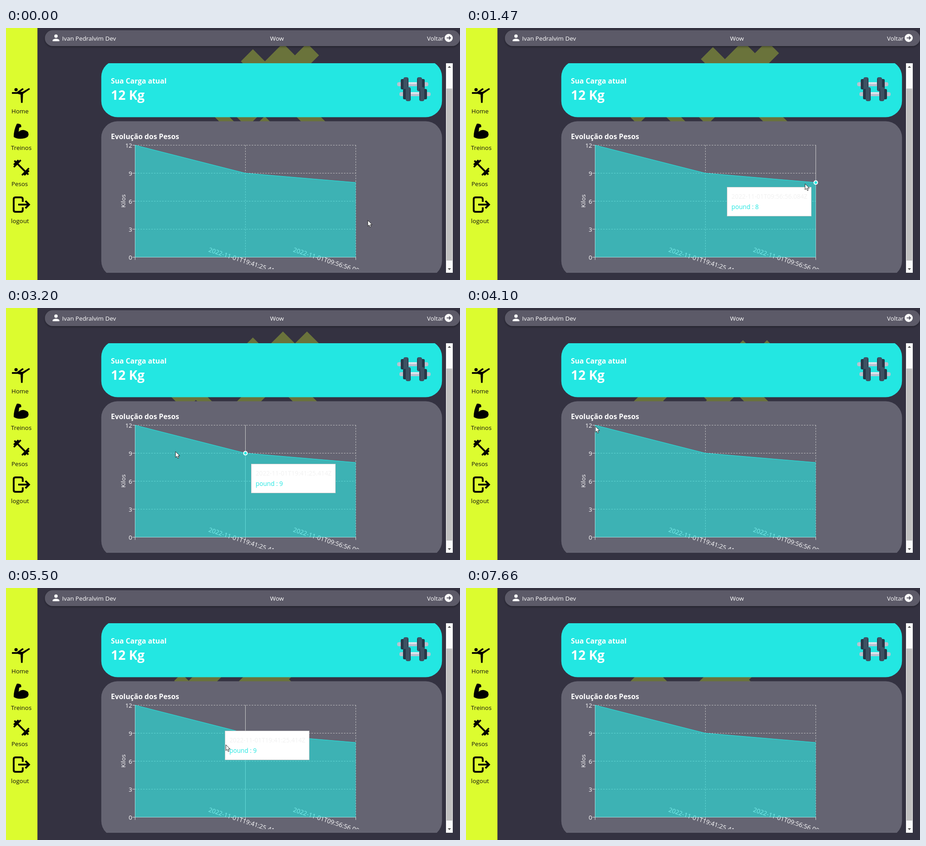
An HTML page for the animation above (7760 ms loop, 1004 by 558 pixels).

```html
<!DOCTYPE html>
<html lang="pt-BR">
<head>
<meta charset="utf-8">
<title>Evolução dos Pesos</title>
<style>
  html, body { margin: 0; width: 100%; height: 100%; overflow: hidden; background: #343241; }
  svg { display: block; width: 100%; height: 100%; }
  text { font: 13.4px "Open Sans", "Noto Sans", sans-serif; fill: #fff; }
  .nav text { fill: #111; }
  .title { font-size: 15.8px; font-weight: 700; }
  .big { font-size: 28.3px; font-weight: 700; }
  .date { font-size: 13.7px; }
  .grid { stroke: #ccc; stroke-dasharray: 3 3; }
  .axis { stroke: #ddd; }
  .end { text-anchor: end; }
</style>
</head>
<body>
<svg viewBox="0 0 1004 558" preserveAspectRatio="none">
  <defs>
    <path id="half" d="M17 15.57 8.43 7 12 3.43 10.57 2 9.14 3.43 7.71 2 5.57 4.14 4.14 2.71 2.71 4.14 4.14 5.57 2 7.71 3.43 9.14 2 10.57 3.43 12 7 8.43 15.57 17z"/>
    <g id="barbell">
      <use href="#half"/>
      <use href="#half" transform="rotate(180 12 12)"/>
    </g>
    <g id="plates">
      <rect x="8" y="4" width="9" height="23" rx="3" fill="#263747"/>
      <rect x="14" width="11" height="31" rx="4" fill="#3d5163"/>
      <path d="M24 3v25" stroke="#2b3d4e" stroke-width="2"/>
    </g>
    <g id="weight">
      <rect y="11" width="69" height="9" rx="4" fill="#b9c1d0"/>
      <rect x="25" y="11" width="18" height="4" fill="#dfe4ed"/>
      <use href="#plates"/>
      <use href="#plates" transform="translate(69) scale(-1 1)"/>
    </g>
    <clipPath id="view"><rect x="210" y="78" width="755" height="464"/></clipPath>
    <clipPath id="plot"><rect x="232" y="250" width="560" height="284"/></clipPath>
    <filter id="shadow" x="-5%" y="-30%" width="110%" height="190%">
      <feDropShadow dx="0" dy="2" stdDeviation="2" flood-opacity=".35"/>
    </filter>
  </defs>

  <rect width="1004" height="558" fill="#343241"/>
  <g fill="#6a733b">
    <use id="large" href="#barbell"/>
    <use id="small" href="#barbell"/>
  </g>

  <rect x="86" y="5" width="918" height="35" rx="17.5" fill="#5b5a67" filter="url(#shadow)"/>
  <path transform="translate(99.3 10.5) scale(.94)" fill="#fff" d="M12 12a4 4 0 1 0 0-8 4 4 0 0 0 0 8zm0 2c-2.67 0-8 1.34-8 4v2h16v-2c0-2.66-5.33-4-8-4z"/>
  <text x="124" y="28">Ivan Pedralvim Dev</text>
  <text x="584" y="28">Wow</text>
  <text x="931" y="28">Voltar</text>
  <circle cx="979" cy="22" r="9" fill="#fff"/>
  <path d="M974.5 22h8M979.5 18.5l3.5 3.5-3.5 3.5" stroke="#5b5a67" stroke-width="2" fill="none"/>

  <g class="nav">
    <rect width="69.5" height="558" fill="#dcfc2f"/>
    <path transform="translate(11.3 125.7) scale(1.82)" d="M4 6a2 2 0 1 1 4 0 2 2 0 0 1-4 0zM1 9h6l7-5 1.310 1.520L11.140 8.500H14L21.800 4 23 5.400 14.500 11 14 22h-2l-.5-10L8 11H1z"/>
    <path d="M24 212Q28 211 33 214L34 219 29 221 28 230Q33 225 40 226 50 228 50 236 49 244 36 245 22 246 17 241 17 226 24 212z"/>
    <use href="#barbell" transform="translate(12.4 287.6) scale(1.8)"/>
    <path d="M37 385v-6q0-4-4-4H21q-4 0-4 4v24q0 4 4 4h12q4 0 4-4v-6M27 391h23M43 383l8 8-8 8" fill="none" stroke="#000" stroke-width="4"/>
    <text x="12" y="189">Home</text>
    <text x="11" y="270">Treinos</text>
    <text x="12" y="350">Pesos</text>
    <text x="11" y="432">logout</text>
  </g>

  <g clip-path="url(#view)">
    <rect x="210.700" y="72" width="753.500" height="125.400" rx="36" fill="#23e7e2"/>
    <rect x="210.700" y="206.600" width="753.500" height="345" rx="36" fill="#656472"/>
  </g>
  <text class="title" x="232" y="123">Sua Carga atual</text>
  <text class="big" x="232" y="159">12 Kg</text>
  <use href="#weight" x="865" y="109"/>
  <use href="#weight" x="870" y="131"/>
  <text class="title" x="232" y="246">Evolução dos Pesos</text>

  <g clip-path="url(#plot)">
    <g id="scale"></g>
    <text class="date" transform="translate(447 495) rotate(18)">2022-11-01T19:41:25.414Z</text>
    <text class="date" transform="translate(634 495) rotate(18)">2022-11-01T09:56:56.084Z</text>
    <path id="line" d="M0 259V507" stroke="#ccc"/>
    <path id="area" fill="#23e7e2" fill-opacity=".6"/>
    <path id="curve" fill="none" stroke="#23e7e2"/>
  </g>
  <text transform="translate(264 383) rotate(-90)" text-anchor="middle">Kilos</text>
  <circle id="dot" r="4" fill="#23e7e2" stroke="#fff" stroke-width="2"/>

  <rect x="973" y="78" width="15" height="464" fill="#fafafa"/>
  <rect x="974" y="134" width="13" height="381" fill="#c1c1c1"/>
  <path d="M977 88l3.500-4 3.500 4zM977 532l3.500 4 3.500-4z" fill="#505050"/>

  <g id="tip">
    <rect x=".5" y=".5" width="186" height="64" fill="#fff" stroke="#ccc"/>
    <text id="date" class="date" x="10" y="26" style="fill:#f1f1f1"></text>
    <text id="value" class="date" x="10" y="49" style="fill:#23e7e2"></text>
  </g>
  <path id="cursor" d="M0 0V13l3-2.700 2 4.700 2.300-1-2-4.500h4.200z" fill="#fff" stroke="#222"/>
</svg>
<script>
const LOOP = 7760;
const CURSOR_EXIT = 7120;
const HOVER_LAG = 150;
const TIP_LAG = 420;
const SLIDE = 385;
const STEP = 20;
const chart = { left: 285.5, right: 773.5, top: 259.5, bottom: 507.5 };
const $ = id => document.getElementById(id);

const points = [
  { pound: 12, date: "2022-11-02T11:20:31.207Z" },
  { pound: 9, date: "2022-11-01T19:41:25.414Z" },
  { pound: 8, date: "2022-11-01T09:56:56.084Z" }
];
const spacing = (chart.right - chart.left) / (points.length - 1);
const yOf = kilos => chart.bottom - (chart.bottom - chart.top) * kilos / 12;
points.forEach((p, i) => {
  p.x = chart.left + i * spacing;
  p.y = yOf(p.pound);
  // The tooltip opens to the right unless it would leave the chart.
  p.tipX = i < 2 ? p.x + 10 : p.x - 197;
});

// Turning points of the pointer: time, x, y.
const pointerPath = [
  [0, 800, 426], [400, 839, 374], [600, 764, 368], [1050, 758, 342],
  [1470, 750, 345], [2780, 500, 335], [3200, 375, 318], [3850, 290, 250],
  [4100, 286, 262], [5080, 455, 306], [5500, 486, 347], [5800, 545, 366],
  [6220, 692, 499], [CURSOR_EXIT, 885, 559]
];

function buildChart() {
  const { left, right, top, bottom } = chart;
  let marks = "";
  for (let kilos = 0; kilos <= 12; kilos += 3) {
    const y = yOf(kilos);
    marks += `<path class="grid" d="M${left} ${y}H${right}"/>
      <path class="axis" d="M${left} ${y}h-6"/>
      <text class="end" x="279" y="${y + 5}">${kilos}</text>`;
  }
  for (const { x } of points) {
    marks += `<path class="grid" d="M${x} ${top}V${bottom}"/>
      <path class="axis" d="M${x} ${bottom}v6"/>`;
  }
  marks += `<path class="axis" fill="none" d="M${left} ${top}V${bottom}H${right}"/>`;
  $("scale").innerHTML = marks;

  const curve = "M" + points.map(p => `${p.x} ${p.y}`).join("L");
  $("curve").setAttribute("d", curve);
  $("area").setAttribute("d", `${curve}V${bottom}H${left}z`);
}

function pointer(t) {
  const time = Math.min(Math.max(t, 0), CURSOR_EXIT - 1);
  const i = pointerPath.findIndex(key => key[0] > time);
  const [t0, x0, y0] = pointerPath[i - 1];
  const [t1, x1, y1] = pointerPath[i];
  const k = (time - t0) / (t1 - t0);
  return { x: x0 + (x1 - x0) * k, y: y0 + (y1 - y0) * k };
}

// The nearest data point, while the pointer is inside the chart.
function hovered(t) {
  const { x, y } = pointer(t - HOVER_LAG);
  const inside = x >= chart.left && x <= chart.right && y >= chart.top && y <= chart.bottom;
  return inside ? points[Math.round((x - chart.left) / spacing)] : null;
}

// Horizontal place of the tooltip, sliding exponentially to each new point.
function tipX(t) {
  let x = points[2].tipX;
  for (let s = 0; s < t; s += STEP) {
    const point = hovered(s);
    if (point) x += (point.tipX - x) * (1 - Math.exp(-STEP / SLIDE));
  }
  return x;
}

// Alternating ease-in drift: slow at the top, sharp turn at the bottom.
function drift(t, start, duration, top) {
  const phase = Math.abs((t - start) / duration);
  const p = phase > 1 ? 2 - phase : phase;
  return top + 118 * p ** 1.67;
}

function place(id, x, y, scale = 1) {
  $(id).setAttribute("transform", `translate(${x} ${y}) scale(${scale})`);
}

function show(id, visible) {
  $(id).style.display = visible ? "" : "none";
}

function draw(t) {
  place("large", 469, drift(t, 1000, 5600, -10), 18.6);
  place("small", 341.6, drift(t, -2300, 8000, 46), 11.2);

  const point = hovered(t);
  for (const id of ["line", "dot", "tip"]) show(id, point);
  if (point) {
    place("line", point.x, 0);
    place("dot", point.x, point.y);
    place("tip", Math.round(tipX(t)), Math.round(pointer(t - TIP_LAG).y + 10));
    $("date").textContent = point.date;
    $("value").textContent = `pound : ${point.pound}`;
  }

  const { x, y } = pointer(t);
  show("cursor", t < CURSOR_EXIT);
  place("cursor", x, y);
}

function tick() {
  draw(performance.now() % LOOP);
  requestAnimationFrame(tick);
}
buildChart();
tick();
</script>
</body>
</html>
```
